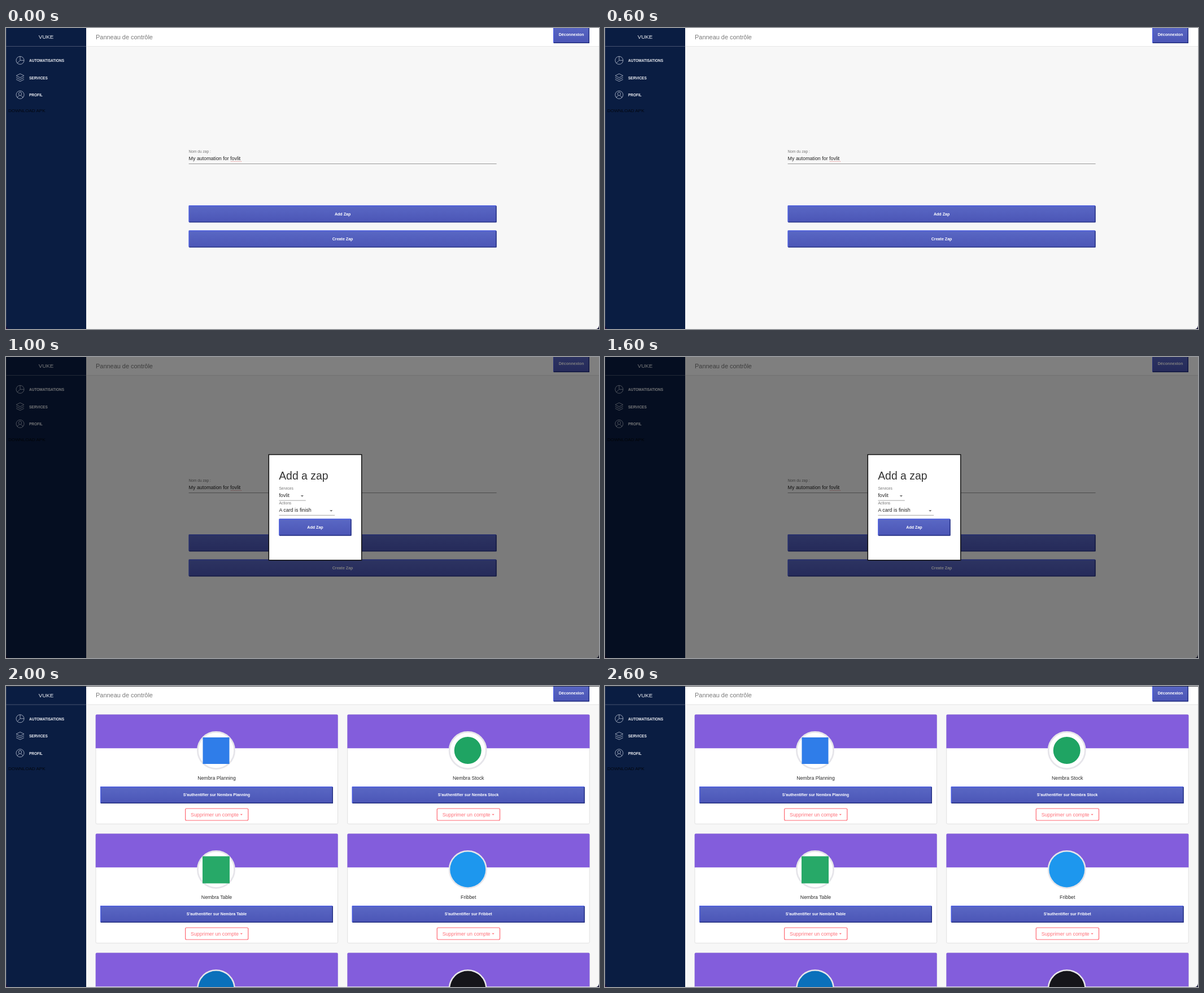
Recreate the animation shown at these times as an HTML page. Size 1050 px wide and 533 px high, loop 3000 ms.

```html
<!DOCTYPE html>
<html lang="fr">
<head>
<meta charset="utf-8">
<title>Panneau de contrôle</title>
<style>
  html, body { margin: 0; width: 100%; height: 100%; overflow: hidden; background: #f7f7f7; }
  svg { display: block; width: 1050px; height: 533px; }
  text { font-family: "Liberation Sans", Arial, sans-serif; }
  .icon { fill: none; stroke: #a9b1c4; stroke-width: .9; }
</style>
</head>
<body>
<svg id="stage" viewBox="0 0 1050 533">
  <defs>
    <linearGradient id="indigo" x1="0" y1="0" x2="0" y2="1">
      <stop offset="0" stop-color="#5a68c4"/>
      <stop offset="1" stop-color="#4b55b6"/>
    </linearGradient>
  </defs>
</svg>
<script>
const stage = document.getElementById("stage");

const rect = (x, y, w, h, fill, extra = "") =>
  `<rect x="${x}" y="${y}" width="${w}" height="${h}" fill="${fill}" ${extra}/>`;
const circle = (x, y, r, fill, extra = "") =>
  `<circle cx="${x}" cy="${y}" r="${r}" fill="${fill}" ${extra}/>`;
const path = (d, extra) => `<path d="${d}" ${extra}/>`;
const text = (x, y, size, fill, label, extra = "") =>
  `<text x="${x}" y="${y}" font-size="${size}" fill="${fill}" ${extra}>${label}</text>`;
const centered = (x, y, size, fill, label, weight = 400) =>
  text(x, y, size, fill, label, `text-anchor="middle" font-weight="${weight}"`);
const caret = (x, y, size, fill) =>
  path(`M${x - size} ${y}h${2 * size}l${-size} ${size}z`, `fill="${fill}"`);

// Raised button: light top and left edges, dark bottom and right edges.
function button(x, y, w, h, label) {
  const edge = (d, color) => path(d, `fill="none" stroke="${color}" stroke-width="1.4"`);
  return rect(x, y, w, h, "url(#indigo)", 'rx="1.5"') +
    edge(`M${x + .7} ${y + h - 1}V${y + .7}H${x + w - 1}`, "#4b5de0") +
    edge(`M${x + 1} ${y + h - .7}H${x + w - .7}V${y + 1}`, "#232f80") +
    centered(x + w / 2, y + h / 2 + 2.4, 7.1, "#fff", label, 700);
}

function sidebar() {
  const item = (y, label) => text(41, y, 6.5, "#eef0f5", label, 'font-weight="700"');
  return rect(0, 0, 142, 533, "#0a1d42") +
    rect(0, 0, .7, 533, "#3a4560") +
    rect(0, 32, 142, 1, "#47536f") +
    centered(71, 19.3, 9.7, "#f0f2f6", "VUKE") +
    `<g class="icon">
      <circle cx="25" cy="57.3" r="7"/>
      <path d="M25 50.3v7h7M25 57.3l-5 5"/>
      <path d="M25 81l7 3.5-7 3.5-7-3.5zM18 87.7l7 3.5 7-3.5M18 91l7 3.5 7-3.5"/>
      <circle cx="25" cy="118.3" r="7"/>
      <ellipse cx="25" cy="116.6" rx="2.6" ry="3"/>
      <path d="M20.3 123.4c0-2.2 2-2.9 3.3-3.4M29.7 123.4c0-2.2-2-2.9-3.3-3.4"/>
    </g>` +
    item(60.2, "AUTOMATISATIONS") + item(90.8, "SERVICES") + item(121.3, "PROFIL") +
    text(4, 148.6, 8.1, "#04070f", "DOWNLOAD APK");
}

const header = () =>
  rect(142, 0, 908, 32, "#fff") + rect(142, 32, 908, 1, "#e6e6e6") +
  text(159, 19.8, 10.95, "#7a7a7a", "Panneau de contrôle") +
  button(969, -5, 64, 32, "").replace(/<text.*/, "") +
  centered(1001, 14.4, 7.1, "#fff", "Déconnexion", 700);

const corners = () =>
  path("M0 527v6h6q-5 0-6-6z", 'fill="#2a1238"') +
  path("M1050 527v6h-6q5 0 6-6z", 'fill="#17163a"');

const form = () =>
  text(323.6, 221, 6.6, "#777", "Nom du zap :") +
  text(323.6, 234.2, 8.9, "#222", "My automation for fovlit") +
  path("M398 236.3h19", 'stroke="#e06a6a" stroke-width=".9" stroke-dasharray="1 1"') +
  rect(323.6, 240, 545, 1, "#999") +
  button(323.6, 314.3, 545, 30, "Add Zap") +
  button(323.6, 358.6, 545, 30, "Create Zap");

function dialog() {
  const select = (y, label, value, width) =>
    text(483.4, y, 6.65, "#777", label) +
    text(483.4, y + 13, 8.9, "#222", value) +
    caret(483 + width - 6, y + 10, 2.6, "#666") +
    rect(483.4, y + 18.6, width, .9, "#999");
  return rect(0, 0, 1050, 533, "#000", 'opacity=".5"') +
    rect(465.3, 172.8, 164.4, 187, "#fff", 'stroke="#111" stroke-width="1.5"') +
    text(483.2, 216.8, 19.4, "#333", "Add a zap") +
    select(235, "Services", "fovlit", 47.4) +
    select(261.2, "Actions", "A card is finish", 98.8) +
    button(483.4, 286.5, 128.2, 30, "Add Zap");
}

const badge = {
  square: (size, color) => rect(372 - size / 2, 114.5 - size / 2, size, size, color),
  circle: (size, color) => circle(372, 114, size / 2, color),
};

const services = [
  ["Nembra Planning", "square", 47, "#2f7de9"],
  ["Nembra Stock", "circle", 48, "#1fa463"],
  ["Nembra Table", "square", 48, "#27a968"],
  ["Fribbet", "circle", 63, "#1d97ee"],
  ["", "circle", 63, "#0a70bb"],
  ["", "circle", 63, "#15151a"],
];

function card([name, shape, size, color], i) {
  const x = i % 2 * 445.7, y = Math.floor(i / 2) * 211;
  return `<g transform="translate(${x} ${y})">` +
    rect(159, 50.5, 428.5, 193.7, "#fff", 'rx="2" stroke="#e0e0e0"') +
    path("M158.7 110.3V52.5q0-2 2-2h425q2 0 2 2v57.8z", 'fill="#835ddc"') +
    circle(372, 114, 32.6, "#fff", 'stroke="#e6e5ea" stroke-width="2.8"') +
    badge[shape](size, color) +
    centered(373, 166.2, 8.75, "#2b2b2b", name) +
    button(167, 178, 412, 30, "S'authentifier sur " + name) +
    rect(317.6, 217, 111.2, 21, "#fff", 'rx="2" stroke="#ff6872" stroke-width="1.2"') +
    text(327, 230.8, 8.9, "#ff7079", "Supprimer un compte") +
    caret(416.8, 226.8, 2.1, "#ff7079") +
    "</g>";
}

const shell = content => rect(0, 0, 1050, 533, "#f7f7f7") + content + header() + sidebar();

const screens = [
  shell(form()) + corners(),
  shell(form()) + corners() + dialog(),
  `<g transform="translate(0 .5)">${shell("")}</g>` +
    services.map(card).join("") + rect(0, 0, 1050, .8, "#15171f") + corners(),
].map(markup => {
  const group = document.createElementNS("http://www.w3.org/2000/svg", "g");
  group.innerHTML = markup;
  stage.append(group);
  return group;
});

const start = performance.now();
function draw() {
  const current = Math.floor((performance.now() - start) / 1000) % screens.length;
  screens.forEach((screen, i) => screen.style.display = i === current ? "" : "none");
  requestAnimationFrame(draw);
}
draw();
</script>
</body>
</html>
```
